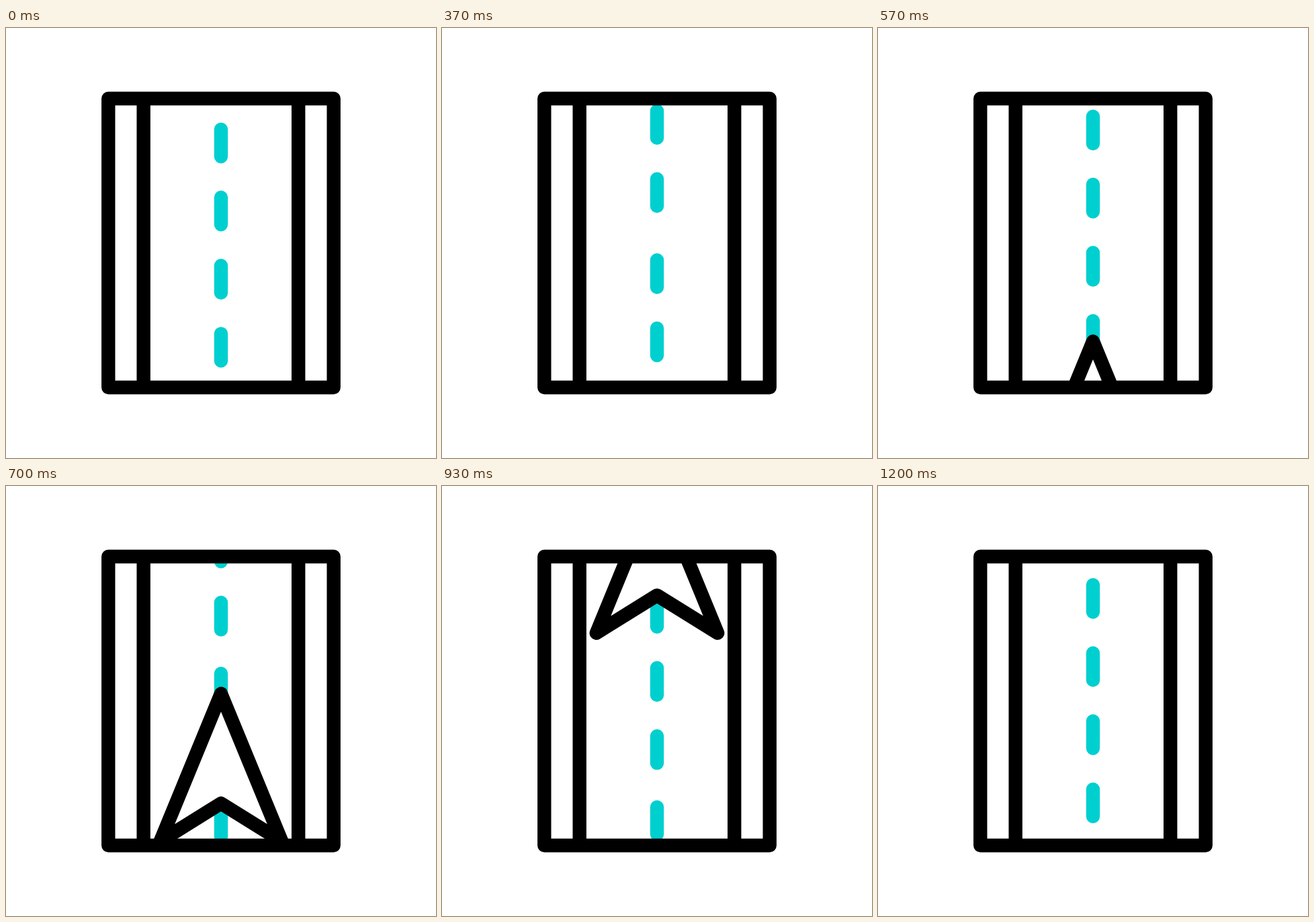
Write an HTML page that moves like this. It is 640 by 640 pixels and loops after 1.67 s.

```html
<!DOCTYPE html>
<html lang="en">
<head>
<meta charset="utf-8">
<title>Road navigation</title>
<style>
  html, body { margin: 0; height: 100%; overflow: hidden; background: #fff; }
  svg { display: block; width: 100%; height: 100%; }
</style>
</head>
<body>
<svg viewBox="0 0 640 640" fill="none" stroke="#000" stroke-width="20.4" stroke-linecap="round" stroke-linejoin="round">
  <clipPath id="road"><path d="M152 105H488V535H152z"/></clipPath>
  <g clip-path="url(#road)">
    <path id="dashes" stroke="#00cfcf"/>
    <path id="arrow" fill="#fff" d="M320 0L410.2 219.4L320 163.4L229.8 219.4z"/>
  </g>
  <path d="M152.3 105H487.7V535H152.3zM204.7 105V535M435.2 105V535"/>
</svg>
<script>
const LOOP = 1670;
const ROAD_TRAVEL = 835;
const dashes = document.getElementById('dashes');
const arrow = document.getElementById('arrow');

const clamp = x => Math.min(1, Math.max(0, x));
const smooth = p => p * p * (3 - 2 * p);

// Cubic bezier easing (x1, 0, x2, 1), solved by bisection
function ease(x, x1, x2) {
  let lo = 0, hi = 1;
  for (let i = 0; i < 30; i++) {
    const p = (lo + hi) / 2, q = 1 - p;
    if (3 * x1 * p * q * q + 3 * x2 * p * p * q + p ** 3 < x) lo = p;
    else hi = p;
  }
  return smooth((lo + hi) / 2);
}

// Three groups of four dashes, stacked upwards
let road = '';
for (const offset of [0, 425, ROAD_TRAVEL])
  for (let i = 0; i < 4; i++) road += `M320 ${147.2 - offset + i * 101.4}v40.3`;
dashes.setAttribute('d', road);

const moveTo = (el, y) => el.setAttribute('transform', `translate(0 ${y.toFixed(3)})`);

function draw(now) {
  const t = now % LOOP;
  // 30 steps per second, on a 10 ms clock
  const step = Math.floor((Math.floor(t / 10) + 0.5) * 0.3);
  moveTo(dashes, ROAD_TRAVEL * ease(clamp((step + 1.8) / 37.8), 0.418, 0.59));
  moveTo(arrow, 554.6 - 692.5 * smooth(clamp((step - 12) / 22.4)));
}

const start = performance.now();
function tick() {
  draw(performance.now() - start);
  requestAnimationFrame(tick);
}
tick();
</script>
</body>
</html>
```
